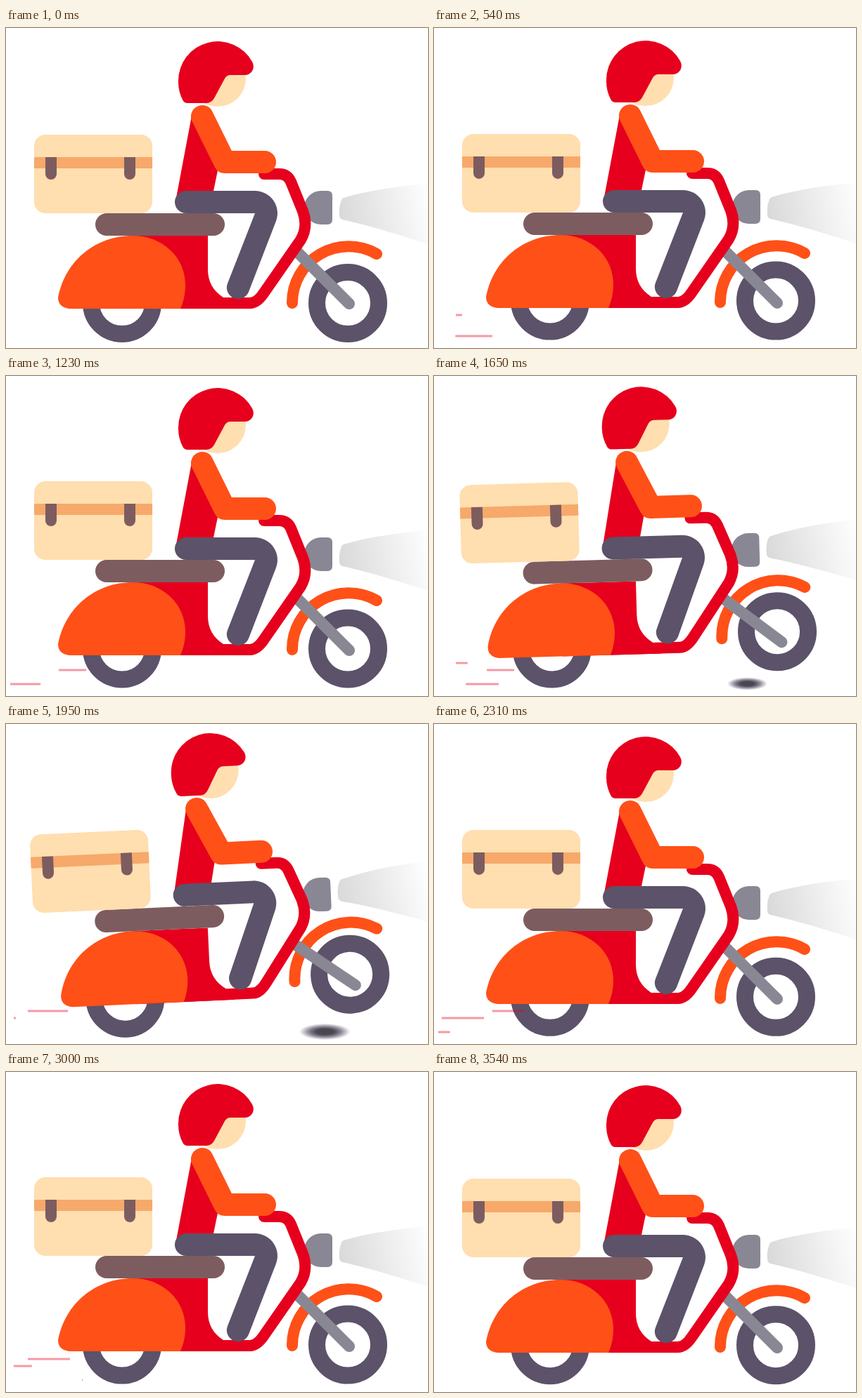
Write an HTML page that moves like this. It is 600 by 456 pixels and loops after 3.57 s.

```html
<!DOCTYPE html>
<html lang="en">
<head>
<meta charset="utf-8">
<title>Delivery scooter</title>
<style>
html, body { margin: 0; width: 100%; height: 100%; overflow: hidden; background: #fff; }
svg { display: block; width: 600px; height: 456px; }
.red { fill: #e6001d; }
.orange { fill: #ff5018; }
.dark { fill: #5c5269; }
.grey { fill: #8a8794; }
.brown { fill: #7d5c60; }
.cream { fill: #ffdeaf; }
.stroke { fill: none; stroke-linecap: round; stroke-linejoin: round; }
.tyre { fill: none; stroke: #5c5269; stroke-width: 24; }
</style>
</head>
<body>
<svg viewBox="0 0 600 456">
  <defs>
    <linearGradient id="light" gradientUnits="userSpaceOnUse" x1="474" y1="264" x2="606" y2="238">
      <stop offset="0" stop-color="#d9d9d9"/>
      <stop offset="1" stop-color="#fff"/>
    </linearGradient>
    <radialGradient id="shade">
      <stop offset="0" stop-color="#484848"/>
      <stop offset=".35" stop-color="#4a4850"/>
      <stop offset=".6" stop-color="#5c5269" stop-opacity=".75"/>
      <stop offset="1" stop-color="#5c5269" stop-opacity="0"/>
    </radialGradient>
  </defs>

  <ellipse id="shadow" cy="438.5" fill="url(#shade)"/>

  <g id="bike">
    <circle id="rear" class="tyre" cx="165" cy="392" r="44"/>
    <circle id="front" class="tyre" cx="486" cy="392" r="44"/>

    <g id="body">
      <path id="beam" fill="url(#light)" d="M480 242Q540 224 640 219V320L600 308Q520 282 478 273Q474 271 474 267Q473 254 477 245Q478 243 480 242Z"/>
      <path id="fender" class="stroke" stroke="#ff5018" stroke-width="16" d="M407 392A80 80 0 0 1 527 322"/>
      <path id="fork" class="stroke" stroke="#8a8794" stroke-width="16" d="M414 319L488 393"/>
      <path class="grey" d="M464 239V273Q464 280 457 280H448A24 24 0 0 1 448 232H457Q464 232 464 239Z"/>

      <path class="red" d="M180 296H287V344Q287 370 309 384L320 400H180Z"/>
      <path class="stroke" stroke="#e6001d" stroke-width="16" d="M367 208H389Q400 208 405 219L422 261Q430 283 419 302L367 377Q357 392 347 392H250"/>
      <path class="orange" d="M90 400Q74 398 74 384C84 331 128 296 180 296C222 296 255 326 255 367Q255 384 248 400Z"/>
      <rect class="brown" x="127" y="264" width="184" height="32" rx="16"/>

      <rect class="cream" x="40" y="152" width="168" height="112" rx="16"/>
      <path fill="#f6a96a" d="M40 184h168v16h-168z"/>
      <path class="brown" d="M56 184h16v24a8 8 0 0 1-16 0zM168 184h16v24a8 8 0 0 1-16 0z"/>

      <path class="red" d="M264 125H280L311 200L301 203L293 242H242Z"/>
      <path class="dark" d="M256 232H354A32 32 0 0 1 384 275L345 376A16 16 0 0 1 315 364L354 264H256A16 16 0 0 1 256 232Z"/>
      <path class="stroke" stroke="#ff5018" stroke-width="32" d="M279 126L311 191H368"/>

      <circle class="cream" cx="301" cy="72" r="40"/>
      <path class="red" d="M350 48A56 56 0 0 0 245 75A56 56 0 0 0 252 104Q254 107 258 107H285Q292 107 296 100L311 72Q314 67 319 67H340C349 67 355 57 350 48Z"/>
    </g>
  </g>

  <g id="lines" fill="#e6001d" fill-opacity=".4"></g>
</svg>
<script>
const LOOP = 3570, STEP = 30, PASS = 400, DASH = 60;
const el = id => document.getElementById(id);
const set = (node, attrs) => { for (const k in attrs) node.setAttribute(k, attrs[k]); };
const shift = (id, y) => set(el(id), { transform: `translate(0 ${y})` });

// Each streak runs from `right` to `left`, once per start time.
const streaks = [
  { y: 409, left: 31, right: 146, starts: [170, 700, 1306, 1740, 2194, 2800] },
  { y: 419, left: 11, right: 125, starts: [120, 630, 1140, 1560, 2110, 2686] },
  { y: 439, left: 6, right: 109, starts: [384, 974, 1524, 1966, 2480, 2999.9] }
];
for (const s of streaks) {
  s.node = document.createElementNS('http://www.w3.org/2000/svg', 'rect');
  set(s.node, { y: s.y - 1.5, height: 3 });
  el('lines').append(s.node);
}

function drawStreak(s, t) {
  const start = s.starts.find(a => t >= a && t < a + PASS);
  let x = s.left, width = 0;
  if (start !== undefined) {
    const p = (t - start) / PASS * 2;
    if (p < 1) {
      // The head rushes ahead, the tail follows.
      const tail = s.right - (s.right - s.left - DASH) * p * p;
      width = DASH * p ** 0.54;
      x = tail - width;
    } else {
      width = DASH * (2 - p);
    }
  }
  set(s.node, { x, width });
}

function bodyBounce(t) {
  const p = t / (1770 / 9) % 1 * 2;
  return -3 * (p < 1 ? p ** 0.6 : 1 - (p - 1) ** 0.6);
}

const wheelBounce = t => -3.5 * Math.abs(Math.sin(Math.PI * t / 84.7)) ** 0.4;

function draw(t) {
  const u = (t - 1585) / 450;
  const lift = u > 0 && u < 1 ? Math.sin(Math.PI * u) : 0;
  const pull = Math.min(1, lift * 1.5);
  const hop = wheelBounce(t);

  set(el('bike'), { transform: `rotate(${-8.4 * lift * lift} 165 296)` });
  shift('body', lift ? 0 : bodyBounce(t));
  shift('rear', hop);
  shift('front', hop - 23 * pull);
  shift('fender', -16.5 * pull);
  shift('beam', -7.5 * pull);
  set(el('fork'), { transform: `rotate(${-10 * pull} 451 356)` });

  const rx = 65 * lift;
  set(el('shadow'), { cx: 417 + rx, rx, ry: 14 * pull });
  for (const s of streaks) drawStreak(s, t);
}

const begin = performance.now();
function tick() {
  const t = (performance.now() - begin) % LOOP;
  draw(Math.floor(t / STEP) * STEP);
  requestAnimationFrame(tick);
}
draw(0);
requestAnimationFrame(tick);
</script>
</body>
</html>
```
